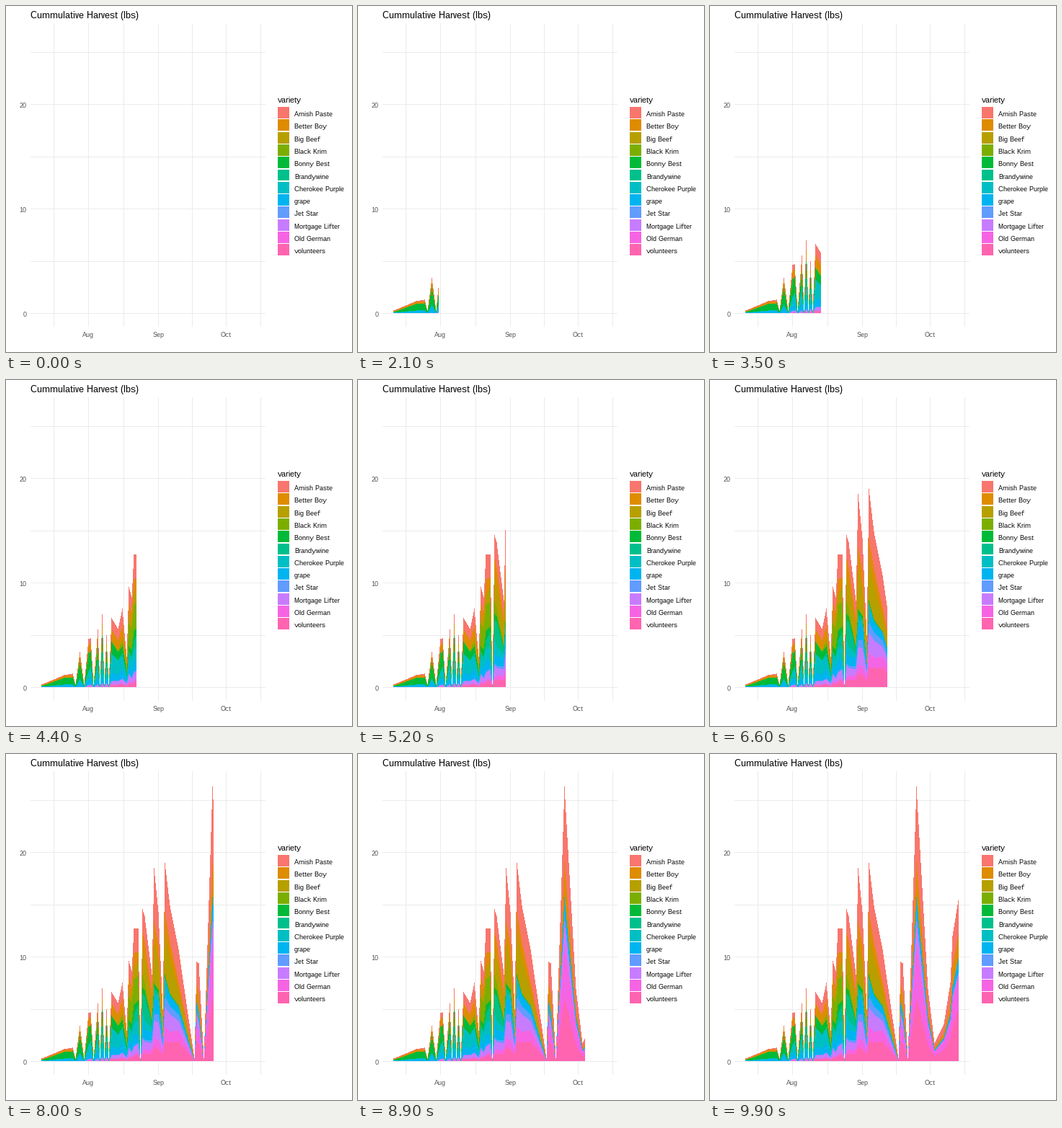
Write a matplotlib script that moves like this. It is 480 px wide and 480 px high and loops after 10000 ms.

```python
import numpy as np
import matplotlib.pyplot as plt
from matplotlib.animation import FuncAnimation
from matplotlib.colors import to_rgba
from matplotlib.patches import Rectangle

plt.rcParams.update({
    "font.family": "Liberation Sans",
    "text.hinting": "native",
    "text.hinting_factor": 1,
})

SIZE, DPI = 480, 72
FRAMES, INTERVAL = 100, 100
LAST_DAY = 95                      # 11 July to 14 October
LEFT, RIGHT, TOP, BOTTOM = 34, 360, 24, 445
GRID, AXIS_TEXT = "#EBEBEB", "#4D4D4D"
KEY_STEP = 17.28

# name, colour, then the season of each variety: weight, middle day, spread
VARIETIES = [
    ("Amish Paste", "#F8766D", 2.6, 65, 38),
    ("Better Boy", "#DE8C00", 1.2, 45, 90),
    ("Big Beef", "#B79F00", 2.2, 53, 13),
    ("Black Krim", "#7CAE00", 2.4, 41, 4),
    ("Bonny Best", "#00BA38", 2.5, 12, 25),
    ("Brandywine", "#00C08B", 1.8, 45, 4),
    ("Cherokee Purple", "#00BFC4", 1.8, 32, 14),
    ("grape", "#00B4F0", 0.9, 40, 70),
    ("Jet Star", "#619CFF", 0.6, 60, 15),
    ("Mortgage Lifter", "#C77CFF", 1.0, 58, 28),
    ("Old German", "#F564E3", 1.8, 80, 25),
    ("volunteers", "#FF64B0", 2.2, 78, 31),
]

# Pounds picked on the main days; next to nothing on the rest days
HARVEST = {
    10: 1.2, 14: 1.3, 17: 3.4, 21: 4.6, 22: 4.7, 25: 5.5, 27: 7, 29: 5,
    31: 6.6, 34: 5.6, 36: 7.5, 38: 2.9, 39: 9.6, 40: 8.6, 41: 12.7, 43: 12.7,
    45: 14.6, 46: 13.9, 49: 8.3, 50: 18.5, 52: 14.3, 54: 5, 55: 19, 57: 14.9,
    61: 10.7, 69: 9.5, 70: 9.4, 76: 26.3, 81: 6.9, 84: 1.7, 88: 3.6, 91: 7.5,
    92: 12, 95: 15.9,
}
REST_DAYS = (0, 15, 19, 23, 26, 28, 30, 44, 68, 72)


def day_x(day):
    return 48.7 + 3.123 * day


def lbs_y(lbs):
    return 426 - 14.48 * lbs


def stack_edges():
    """Days, and the upper edge of each layer with the zero line last."""
    totals = dict.fromkeys(REST_DAYS, .25) | HARVEST
    days = np.array(sorted(totals))
    weight, middle, spread = np.array([v[2:] for v in VARIETIES]).T[..., None]
    rng = np.random.default_rng(4)
    mix = weight * np.exp(-((days - middle) / spread) ** 2)
    mix *= rng.uniform(.75, 1.25, mix.shape)
    layers = mix / mix.sum(axis=0) * [totals[d] for d in days]
    tops = np.cumsum(layers[::-1], axis=0)[::-1]
    return days, np.vstack([tops, np.zeros(len(days))])


def paint_areas():
    """The finished chart area as hard-edged pixels on a clear ground."""
    days, edges = stack_edges()
    cols, rows = np.arange(SIZE), np.arange(SIZE)
    xs = np.round(day_x(days))
    ys = np.array([np.interp(cols, xs, np.round(lbs_y(edge)))
                   for edge in edges])
    layer = (rows[None, :, None] >= ys[:, None, :]).sum(axis=0)
    layer[:, cols < xs[0]] = 0
    clear = (1, 1, 1, 0)
    palette = np.array([clear, *(to_rgba(v[1]) for v in VARIETIES), clear])
    return palette[layer]


fig = plt.figure(figsize=(SIZE / DPI, SIZE / DPI), dpi=DPI, facecolor="white")
ax = fig.add_axes([0, 0, 1, 1])


def box(x, y, w, h, color):
    ax.add_patch(Rectangle((x, y), w, h, fc=color, lw=0, antialiased=False))


def label(x, y, text, size, color="black", ha="left"):
    ax.text(x, y, text, fontsize=size, color=color, ha=ha, va="baseline")


def draw_axes():
    for day in (5.5, 21, 36.5, 52, 67, 82, 97.5):
        box(round(day_x(day)), TOP, 1, BOTTOM - TOP, GRID)
    for lbs in range(0, 30, 5):
        box(LEFT, round(lbs_y(lbs)), RIGHT - LEFT, 1, GRID)
    for lbs in (0, 10, 20):
        label(28.5, round(lbs_y(lbs)) + 5, str(lbs), 9, AXIS_TEXT, "right")
    for text, day in (("Aug", 21), ("Sep", 52), ("Oct", 82)):
        label(day_x(day), 459, text, 9, AXIS_TEXT, "center")
    label(34, 17, "Cummulative Harvest (lbs)", 13)


def draw_legend():
    label(377, 134, "variety", 11)
    for i, (name, color, *_) in enumerate(VARIETIES):
        top = round(140.11 + KEY_STEP * i)
        bottom = round(156.08 + KEY_STEP * i)
        box(377, top, 16, bottom - top, color)
        label(400, top + 13, name, 9)


draw_axes()
draw_legend()
areas = paint_areas()
picture = ax.imshow(np.zeros_like(areas), extent=(0, SIZE, SIZE, 0),
                    interpolation="nearest", aspect="auto", zorder=2)
ax.set(xlim=(0, SIZE), ylim=(SIZE, 0))
ax.axis("off")


def update(frame):
    now = LAST_DAY * frame / (FRAMES - 1)
    shown = areas.copy()
    shown[:, round(day_x(now)):] = 0
    picture.set_data(shown)
    return [picture]


anim = FuncAnimation(fig, update, frames=FRAMES, interval=INTERVAL,
                     repeat=True, repeat_delay=0, blit=False)
plt.show()
```
